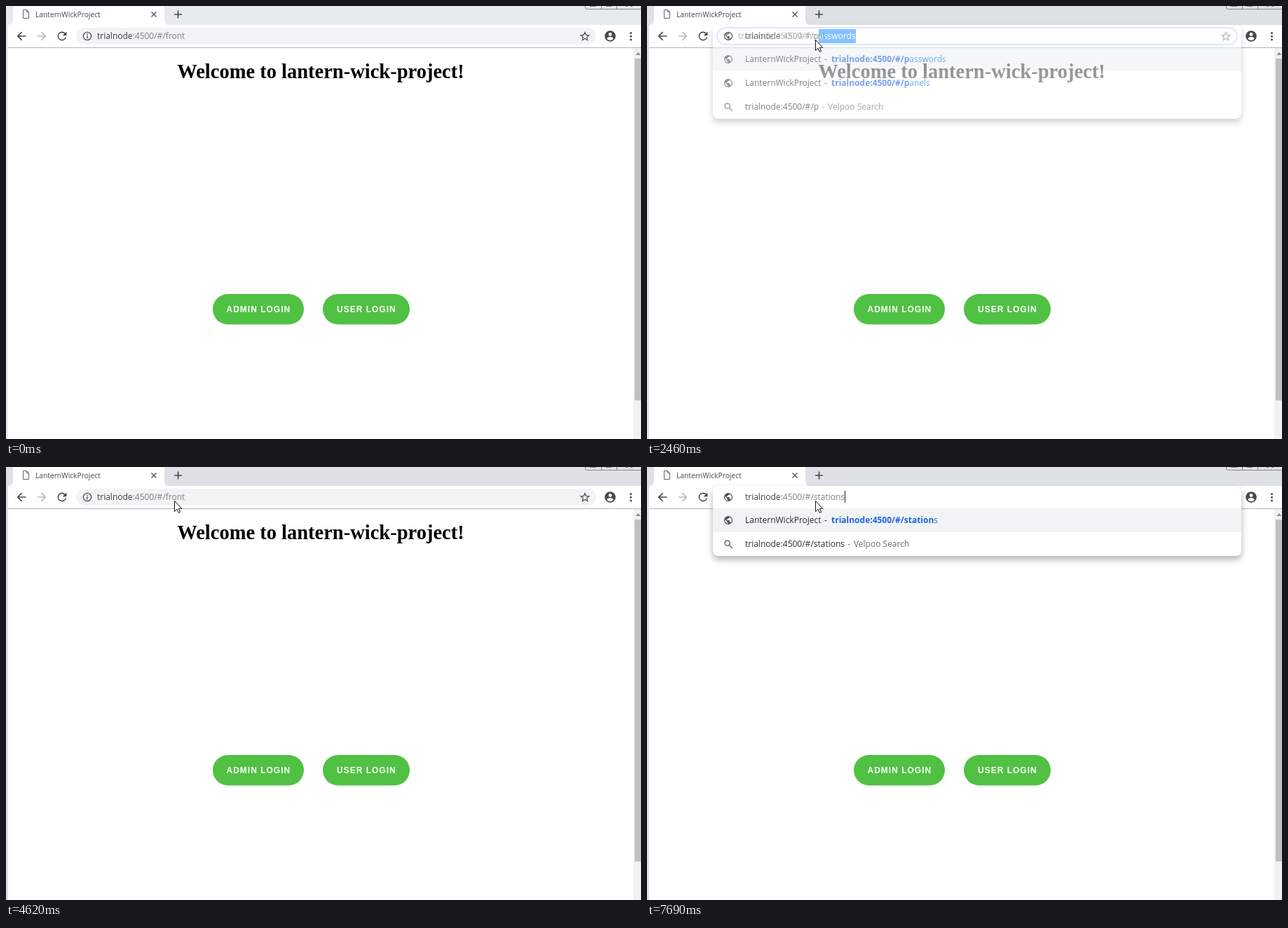
Write an HTML page that moves like this. It is 906 px wide and 618 px high and loops after 8000 ms.

```html
<!DOCTYPE html>
<html lang="en">
<head>
<meta charset="utf-8">
<title>Login guard demo</title>
<style>
html, body { margin: 0; width: 100%; height: 100%; overflow: hidden; background: #fff; }
#stage { position: relative; width: 906px; height: 618px; overflow: hidden;
  font: 12px "Open Sans", sans-serif; color: #2b2e32; }
#stage > svg { position: absolute; left: 0; top: 0; }
#pill { position: absolute; left: 99px; top: 30px; width: 744px; height: 26px; box-sizing: border-box;
  border: 1px solid #fff; border-radius: 13px; background: #f1f3f4; background-clip: padding-box; }
#pill.focus { border: 2px solid #a6c6fa; background: #fff; }
.line { position: absolute; white-space: pre; }
.url { top: 33px; height: 20px; line-height: 20px; color: #7d8288; }
.url b { font-weight: 400; color: #3c4043; }
.url .sel, .url .sel b { background: #3399ff; color: #fff; }
.url span { display: inline-block; height: 20px; }
.caret { width: 1px; margin-right: -1px; background: #222; height: 17px !important; vertical-align: top; margin-top: 1px; }
#popup { position: absolute; left: 94px; top: 27px; width: 754px; border-radius: 8px; background: #fff;
  box-shadow: 0 5px 10px rgba(0, 0, 0, .3); }
#popup .row { position: relative; height: 34px; line-height: 34px; }
#popup .row:first-child { height: 32px; }
#popup .row:nth-child(2) { background: #f1f3f4; }
#popup .url { left: 46px; top: 6px; }
#popup svg { position: absolute; left: 14px; top: 9px; }
#popup .row:first-child svg { top: 8px; }
.link { left: 169px; color: #1a73e8; }
.link b { font-weight: 700; color: #1a66e4; }
.dim { color: #6b6f75; }
</style>
</head>
<body>
<div id="stage">
  <svg width="906" height="618" viewBox="0 0 906 618">
    <rect width="906" height="618" fill="#fff"/>
    <path id="frame" d="M0 0H906V27H3V618H0z"/>
    <path d="M3 27c5 0 7-3 7-8V0H226V19c0 5 2 8 8 8z" fill="#fff"/>
    <path d="M3 59.5H906" stroke="#b4b5b7"/>

    <path d="M24.5 5.5h5l3 3v9h-8zM29.5 5.5v3.2h3" fill="none" stroke="#5f6368"/>
    <text x="42" y="15.5" font-size="10.26" fill="#45494d">LanternWickProject</text>
    <path d="M207.5 8.500l7 7m0-7l-7 7" stroke="#505458" stroke-width="1.4"/>
    <path d="M240 12h11M245.500 6.500v11" stroke="#45494d" stroke-width="1.7"/>
    <path d="M826.500 0v2q0 2.500 3 2.500H906M849.500 0v4.500M871.500 0v4.500" fill="none" stroke="#858a91"/>
    <path d="M833 .5h9M856 .5h8M884 .5h3m4 0h3" stroke="#777c83"/>

    <g fill="#45494d">
      <path id="back" transform="translate(12.4 33.4) scale(.8)" d="M20 11H7.83l5.59-5.59L12 4l-8 8 8 8 1.41-1.41L7.83 13H20z"/>
      <path transform="translate(60.600 33.400) scale(-.8 .8)" fill="#b6b9bd" d="M20 11H7.83l5.59-5.59L12 4l-8 8 8 8 1.41-1.41L7.83 13H20z"/>
      <path transform="translate(70.400 33.400) scale(.8)" d="M17.65 6.35A8 8 0 1 0 19.73 14h-2.08A6 6 0 1 1 12 6c1.66 0 3.14.69 4.22 1.78L13 11h7V4z"/>
      <circle cx="862" cy="43" r="7.800"/>
      <circle cx="862" cy="40.500" r="2.400" fill="#fff"/>
      <path d="M857.300 46.700q1-2.600 4.700-2.600t4.700 2.600q-1.800 2.300-4.700 2.300t-4.700-2.300z" fill="#fff"/>
      <circle cx="891.500" cy="38.500" r="1.500"/><circle cx="891.500" cy="43.300" r="1.500"/><circle cx="891.500" cy="48.100" r="1.500"/>
    </g>

    <rect x="895" y="60" width="11" height="558" fill="#f1f1f1"/>
    <path d="M898.500 70l3.500-4 3.500 4z" fill="#8c8c8c"/>
    <rect x="897" y="75" width="9" height="488" fill="#c1c1c1"/>

    <text x="449" y="103" text-anchor="middle" font-family="Liberation Serif, serif" font-weight="700" font-size="28.5">Welcome to lantern-wick-project!</text>
    <g fill="#50c143">
      <rect x="295" y="411" width="130" height="43.500" rx="21.700"/>
      <rect x="452" y="411" width="124" height="43.500" rx="21.700"/>
    </g>
    <g font-family="Liberation Sans, sans-serif" font-weight="700" font-size="12" letter-spacing="1" fill="#fff">
      <text x="314.500" y="437">ADMIN LOGIN</text>
      <text x="472" y="437">USER LOGIN</text>
    </g>
  </svg>
  <div id="pill"></div>
  <svg width="906" height="618" fill="none" stroke="#4d5156">
    <circle cx="116" cy="43" r="5.700" stroke-width="1.300"/>
    <path d="M116 42v4.200M116 39.500v1.500" stroke-width="1.400"/>
    <path d="M826 37.600l1.700 3.800 4.100.4-3.100 2.800.9 4.100-3.600-2.200-3.600 2.200.9-4.100-3.100-2.800 4.100-.4z" stroke-width="1.300"/>
  </svg>
  <div id="address" class="line url" style="left:130px"></div>
  <div id="popup"></div>
  <svg width="906" height="618">
    <circle id="ring" cx="240" cy="47.500" r="10.500" fill="#ff0" fill-opacity=".47"/>
    <g id="pointer">
      <path id="arrow" d="M.5.5V15.500L4 12.200 6.300 17.400 8.600 16.400 6.300 11.300H10.800z" fill="#fff" stroke="#111"/>
      <path id="beam" d="M-3.500-8.500H-1Q0-8.500 0-7.500 0-8.500 1-8.500H3.500M0-7.500V7.500M-3.500 8.500H-1Q0 8.500 0 7.500 0 8.500 1 8.500H3.500" fill="none" stroke="#222"/>
    </g>
  </svg>
</div>
<script>
const $ = id => document.getElementById(id);
const LOOP = 8000, HOST = 'trialnode', PATH = ':4500/#/', TITLE = 'LanternWickProject';
const within = (t, a, b) => t >= a && t < b;
const clamp = (v, a, b) => Math.min(b, Math.max(a, v));

const runs = [
  { word: 'passwords', pages: ['passwords', 'panels'], boldMax: 9, end: 4550,
    keys: [2460, 3000, 3240, 3470, 3700, 3930, 4010, 4090, 4320] },
  { word: 'stations', pages: ['station', 'stations'], boldMax: 7, end: LOOP,
    keys: [6490, 6740, 6970, 7050, 7270, 7430, 7520, 7690] }
];

const svg = body => `<svg width="16" height="16" viewBox="0 0 24 24">${body}</svg>`;
const globe = svg('<path fill="#4d5156" transform="translate(1.2 1.2) scale(.9)" d="M12 2a10 10 0 1 0 0 20 10 10 0 0 0 0-20zm-1 17.930c-3.950-.49-7-3.850-7-7.930 0-.62.08-1.210.21-1.790L9 15v1c0 1.100.9 2 2 2zm6.900-2.540c-.26-.81-1-1.390-1.900-1.390h-1v-3c0-.55-.45-1-1-1H8v-2h2c.55 0 1-.45 1-1V7h2c1.100 0 2-.9 2-2v-.41c2.930 1.190 5 4.060 5 7.410 0 2.080-.8 3.970-2.100 5.390z"/>');
const lens = svg('<g fill="none" stroke="#5f6368" stroke-width="2.1"><circle cx="10" cy="10" r="5.500"/><path d="M14 14l6.500 6.500"/></g>');

const caret = '<span class="caret"></span>';
const sel = s => `<span class="sel">${s}</span>`;
const base = `<b>${HOST}</b>${PATH}`;
const row = body => `<div class="row">${body}</div>`;

function popupHtml(run, n) {
  const typed = run.word.slice(0, n);
  const hits = run.pages.filter(p => p.startsWith(typed));
  const rest = hits[0].slice(n);
  const cut = Math.min(n, run.boldMax);
  const links = hits.map(p => row(globe +
    `<span class="line" style="left:46px">${TITLE}</span><span class="line" style="left:159px">-</span>` +
    `<span class="line link"><b>${HOST + PATH + p.slice(0, cut)}</b>${p.slice(cut)}</span>`));
  const search = row(lens + `<span class="line" style="left:46px">${HOST + PATH + typed}` +
    '<span class="dim" style="margin-left:4px">-<span style="margin-left:5px">Velpoo Search</span></span></span>');
  return row(globe + `<div class="line url">${base + typed}${rest ? sel(rest) : caret}</div>`) + links.join('') + search;
}

function addressHtml(t) {
  if (within(t, 1050, 1130) || within(t, 5550, 5620)) return sel(base + 'front');
  if (within(t, 1290, 2460) || within(t, 5620, 6490)) return base + sel('front');
  return base + (within(t, 4550, 4620) ? 'passwords' : 'front');
}

// The pointer enters bottom right, overshoots the address, then settles on it.
function pointerAt(t) {
  const k = clamp(Math.floor((t - 130) / 77), 0, 10);
  if (k <= 7) {
    const u = k / 7, e = u * u * (3 - 2 * u);
    return [807 - 695 * e, 600 - 550 * e];
  }
  const v = (k - 7) / 3;
  return [112 + 128 * v, 50 - 2 * v];
}

const cache = {};
function setHtml(id, html) {
  if (cache[id] !== html) $(id).innerHTML = cache[id] = html;
}
const show = (id, on) => { $(id).style.display = on ? '' : 'none'; };

function render(t) {
  const run = runs.find(r => within(t, r.keys[0], r.end));
  show('popup', run);
  if (run) {
    setHtml('popup', popupHtml(run, run.keys.filter(k => k <= t).length));
    $('popup').style.opacity = t < run.keys[0] + 80 ? .6 : 1;
  }
  $('frame').setAttribute('fill', t < 970 ? '#e7eaed' : '#dee1e6');
  $('pill').className = within(t, 970, 4550) || t >= 5480 ? 'focus' : '';
  setHtml('address', addressHtml(t));
  show('ring', within(t, 970, 1050) || within(t, 1130, 1450) || within(t, 5480, 5550) || within(t, 5620, 5780));

  const [x, y] = pointerAt(t);
  const beam = (t < 1290 && y < 57 && x > 125) || within(t, 5480, 5620);
  show('pointer', t >= 130);
  show('beam', beam);
  show('arrow', !beam);
  $('pointer').setAttribute('transform', `translate(${Math.round(x)} ${Math.round(y)})`);
}

const start = performance.now();
function tick() {
  render((performance.now() - start) % LOOP);
  requestAnimationFrame(tick);
}
tick();
</script>
</body>
</html>
```
